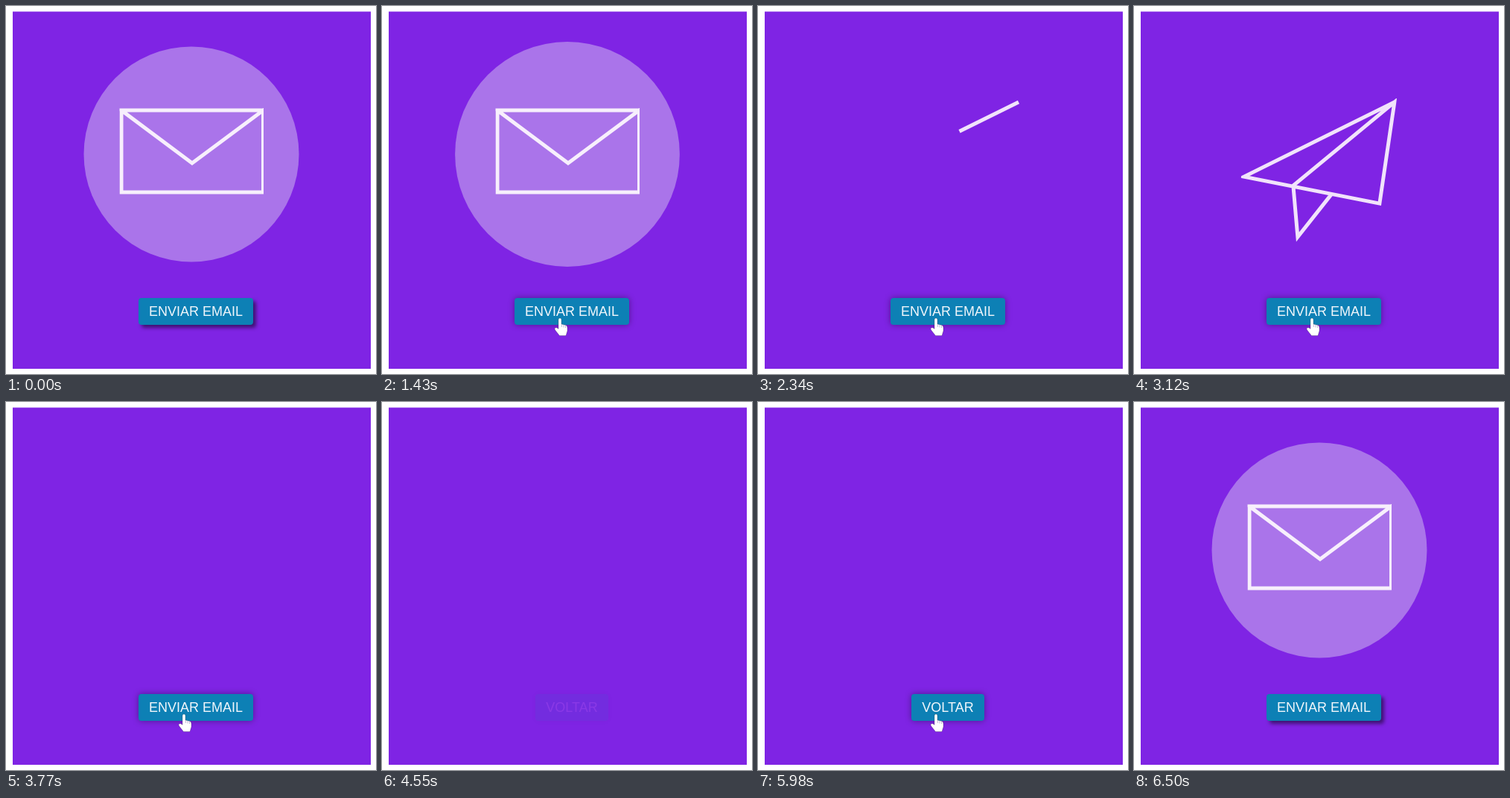
An HTML page for the animation above (7280 ms loop, 497 by 494 pixels).

```html
<!DOCTYPE html>
<html lang="pt">
<head>
<meta charset="utf-8">
<title>Enviar email</title>
<style>
  html, body { margin: 0; width: 100%; height: 100%; overflow: hidden; background: #fff; }
  svg { position: absolute; left: 0; top: 0; width: 497px; height: 494px; }
  .line { fill: none; stroke-width: 5; stroke-miterlimit: 10; }
  .button {
    position: absolute; top: 392px; height: 36px; border-radius: 4px;
    background: #0d80b5; color: #f1f6fb; text-align: center; white-space: nowrap;
    font: 18px/36px "Liberation Sans", Arial, sans-serif;
  }
  #send { left: 178px; width: 154px; }
  #back { left: 206px; width: 98px; }
</style>
</head>
<body>
<svg viewBox="0 0 497 494">
  <defs>
    <clipPath id="panelClip"><rect x="9" y="7.5" width="481" height="479.5"/></clipPath>
    <clipPath id="mailClip"><rect x="152.5" y="137" width="193.5" height="116"/></clipPath>
    <clipPath id="planeClip"><rect x="144" y="124" width="209" height="193"/></clipPath>
  </defs>
  <rect x="9" y="7.5" width="481" height="479.5" fill="#7f24e4"/>
  <g clip-path="url(#panelClip)">
    <circle id="disc" cx="249" cy="199" r="144.5" fill="#aa74ea"/>
    <g clip-path="url(#mailClip)">
      <path id="mail" class="line" stroke="#f7effc" pathLength="1"
        d="M345.5 140H155L250 211L345.5 140V250H155V140"/>
    </g>
    <g id="flight">
      <g clip-path="url(#planeClip)">
        <path id="plane" class="line" stroke="#f1e3fb" pathLength="1"
          d="M350 129L148 229L330 265L350 129L214 241L220 310L265 253"/>
      </g>
    </g>
  </g>
</svg>
<div id="send" class="button">ENVIAR EMAIL</div>
<div id="back" class="button">VOLTAR</div>
<svg viewBox="0 0 497 494">
  <g id="cursor">
    <path id="arrow" fill="#fff" stroke="#222" stroke-width=".8"
      d="M0 0V16L3.7 12.5L6.1 18.1L8.7 17L6.3 11.5H11.5Z"/>
    <g id="hand" transform="translate(-7 0)">
      <path fill="#fff" stroke="#000" stroke-opacity=".3" stroke-width=".7"
        d="M5 2Q5 0 7 0T9 2V8L15 9.5Q17 10 17 13V17L15 23.5H6.5L1 16.5Q-1 14 1 13Q3 12 5 14.5Z"/>
      <path fill="none" stroke="#a99ac4" stroke-width=".7" d="M9.3 8V12M12 9V12.5M14.5 9.8V13"/>
    </g>
  </g>
</svg>
<script>
const LOOP = 7280, STEP = 130, RESET = 6110, CURSOR_OUT = 6500;
const REST = [239, 419];
const $ = id => document.getElementById(id);
const clamp = x => Math.min(1, Math.max(0, x));
const span = (t, from, to) => clamp((t - from) / (to - from));
const inOut = x => x < .5 ? 2 * x * x : 1 - 2 * (1 - x) ** 2;
const backIn = (x, s) => x * x * ((s + 1) * x - s);

// time, x, y of the pointer tip
const pointerPath = [
  [130, 476, 475], [260, 440, 468], [390, 385, 455], [520, 325, 441], [650, 280, 430],
  [780, 254, 424], [1170, ...REST], [6110, ...REST], [6240, 264, 444], [6370, 304, 474], [6500, 340, 500]
];

function pointerAt(t) {
  const i = Math.max(1, pointerPath.findIndex(p => p[0] >= t));
  const [a, b] = [pointerPath[i - 1], pointerPath[i]];
  const k = span(t, a[0], b[0]);
  return [a[1] + (b[1] - a[1]) * k, a[2] + (b[2] - a[2]) * k];
}

// Shows only the part of a path between two fractions of its length.
function trim(path, from, to) {
  path.style.visibility = to - from > .001 ? "visible" : "hidden";
  path.style.strokeDasharray = to - from > .999 ? "none" : `0 ${from} ${to - from} 2`;
}

function setButton(button, opacity, hover) {
  const offset = 4 * (1 - hover);
  button.style.opacity = opacity;
  button.style.boxShadow = `${offset}px ${offset}px ${5 + 3 * hover}px rgba(0,0,0,${.5 - .12 * hover})`;
}

function drawScene(t) {
  const shrink = backIn(span(t, 1275, 2075), 1.70158);
  $("disc").setAttribute("r", Math.max(0, 144.5 * (1 - shrink)));

  const erased = span(t, 1300, 2270) ** 3;
  trim($("mail"), .568 * erased, 1 - .432 * erased);

  trim($("plane"), 0, inOut(span(t, 2150, 2990)));
  const fly = backIn(span(t, 3110, 3640), .95);
  $("flight").setAttribute("transform", `translate(${380 * fly} ${-330 * fly})`);
}

function drawPointer(t, shown) {
  const [x, y] = pointerAt(t);
  const overButton = x > 178 && x < 332 && y > 392 && y < 428;
  const present = t >= STEP && t < CURSOR_OUT;
  $("cursor").setAttribute("transform", `translate(${x} ${y})`);
  $("cursor").style.opacity = present ? shown : 0;
  $("hand").style.display = overButton ? "" : "none";
  $("arrow").style.display = overButton ? "none" : "";
}

function frame(now) {
  const t = Math.floor((now % LOOP) / STEP) * STEP;
  const isReset = t >= RESET;
  drawScene(isReset ? 0 : t);

  const sendShown = isReset ? 1 : 1 - inOut(span(t, 4050, 4450));
  const backShown = isReset ? 0 : inOut(span(t, 4420, 5020));
  const hover = span(t, 650, 910) - span(t, 6110, 6370);
  setButton($("send"), sendShown, hover);
  setButton($("back"), backShown, hover);
  drawPointer(t, isReset ? 1 : Math.max(sendShown, span(t, 4680, 4940)));
  requestAnimationFrame(frame);
}
frame(0);
</script>
</body>
</html>
```
